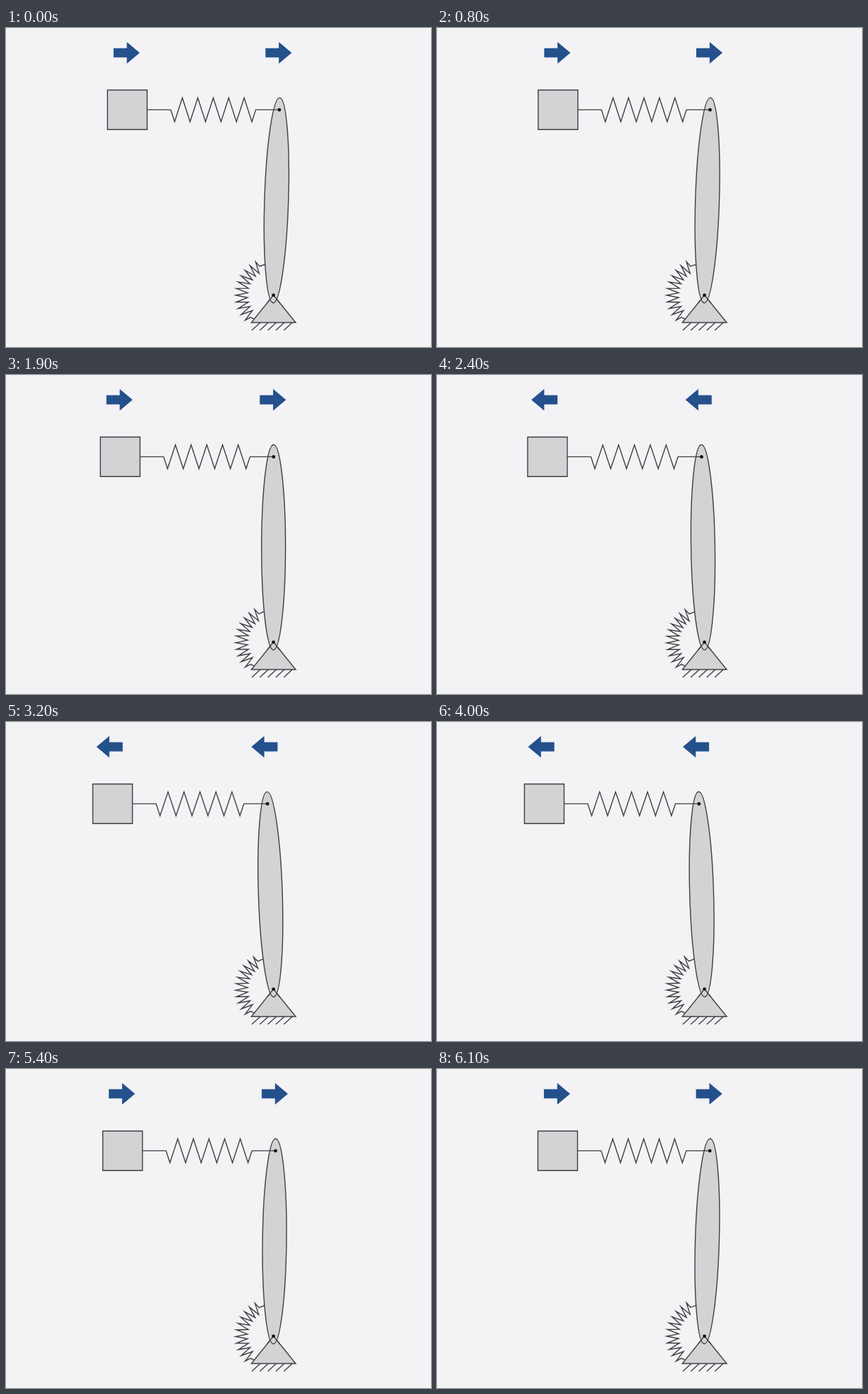
These frames come from a looping animation (600x450 px, 6200 ms). An HTML page with a canvas:

```html
<!DOCTYPE html>
<html>
<head>
<meta charset="utf-8">
<style>
html, body { margin: 0; width: 100%; height: 100%; overflow: hidden; background: #f3f2f5; }
canvas { display: block; }
</style>
</head>
<body>
<canvas id="stage" width="600" height="450"></canvas>
<script>
const ctx = document.getElementById('stage').getContext('2d');
const LOOP = 6200, STEP = 100;
const INK = '#403e42', FILL = '#d3d2d4', BLUE = '#24508c', PAPER = '#f3f2f5';
const pivot = { x: 377.6, y: 376.8 };
const axisY = 115.4, armLength = pivot.y - axisY;

function path(points, { fill, stroke = INK, close = false } = {}) {
  ctx.beginPath();
  points.forEach(([x, y]) => ctx.lineTo(x, y));
  if (close) ctx.closePath();
  if (fill) { ctx.fillStyle = fill; ctx.fill(); }
  if (stroke) { ctx.strokeStyle = stroke; ctx.stroke(); }
}

function dot(x, y) {
  ctx.beginPath();
  ctx.arc(x, y, 2.4, 0, 2 * Math.PI);
  ctx.fillStyle = '#111';
  ctx.fill();
}

function arrow(x, dir) {
  const outline = [[-18.5, -6.4], [0.3, -6.4], [0.3, -15.2], [18.5, 0], [0.3, 15.2], [0.3, 6.4], [-18.5, 6.4]];
  path(outline.map(([dx, dy]) => [x + dir * dx, 35 + dy]), { fill: BLUE, stroke: null, close: true });
}

// Zigzag in (along, across) coordinates: `peaks` alternating tips between two ends.
function zigzag(from, to, peaks, height) {
  const pitch = (to - from) / peaks;
  const tips = Array.from({ length: peaks }, (_, i) => [from + (i + 0.5) * pitch, i % 2 ? -height : height]);
  return [[from, 0], ...tips, [to, 0]];
}

function linearSpring(x1, x2) {
  const lead = 33.3;
  const coil = [[x1, 0], ...zigzag(x1 + lead, x2 - lead, 11, 16.8), [x2, 0]];
  path(coil.map(([x, dy]) => [x, axisY + dy]));
}

// Angles in degrees, counter-clockwise from straight up.
function torsionSpring(start) {
  const coil = [[start, 0], ...zigzag(start + 11, 134, 21, 8.3), [140.5, -1.5]];
  path(coil.map(([deg, dr]) => {
    const a = deg * Math.PI / 180, r = 45 + dr;
    return [pivot.x - r * Math.sin(a), pivot.y - r * Math.cos(a)];
  }));
}

function rod(angle) {
  const reach = 133.8;
  ctx.beginPath();
  ctx.ellipse(pivot.x + reach * Math.sin(angle), pivot.y - reach * Math.cos(angle), 16.9, 144.8, angle, 0, 2 * Math.PI);
  ctx.fillStyle = FILL;
  ctx.fill();
  ctx.stroke();
}

function support() {
  const base = 415.5;
  const triangle = [[pivot.x, pivot.y], [409, base], [346.4, base]];
  path(triangle, { fill: FILL, close: true });
  for (let i = 0; i < 5; i++) {
    const x = 359 + i * 11.3;
    path([[x, base], [x - 12, base + 11]]);
  }
}

function draw(ms) {
  const swing = Math.cos(ms / 1000 - 0.35);
  const blockX = 161 + 10.95 * swing;
  const tipX = pivot.x + 8.8 * swing;
  const angle = Math.asin((tipX - pivot.x) / armLength);
  const dir = Math.sign(swing);
  const nudge = dir > 0 ? -1 : -4.3;

  ctx.fillStyle = PAPER;
  ctx.fillRect(0, 0, 600, 450);
  ctx.lineWidth = 1.4;
  ctx.lineJoin = 'miter';

  arrow(blockX + nudge, dir);
  arrow(tipX + nudge, dir);

  const [left, right] = [blockX - 28, blockX + 28];
  path([[left, 87.5], [right, 87.5], [right, 143.2], [left, 143.2]], { fill: FILL, close: true });

  torsionSpring(16.5 - angle * 180 / Math.PI);
  support();
  rod(angle);
  path([[pivot.x - 9, pivot.y + 11.1], [pivot.x, pivot.y], [pivot.x + 9, pivot.y + 11.1]]);
  linearSpring(right, tipX);
  dot(tipX, axisY);
  dot(pivot.x, pivot.y);
}

const began = performance.now();
function tick() {
  const ms = (performance.now() - began) % LOOP;
  draw(Math.floor(ms / STEP) * STEP);
  requestAnimationFrame(tick);
}
tick();
</script>
</body>
</html>
```
